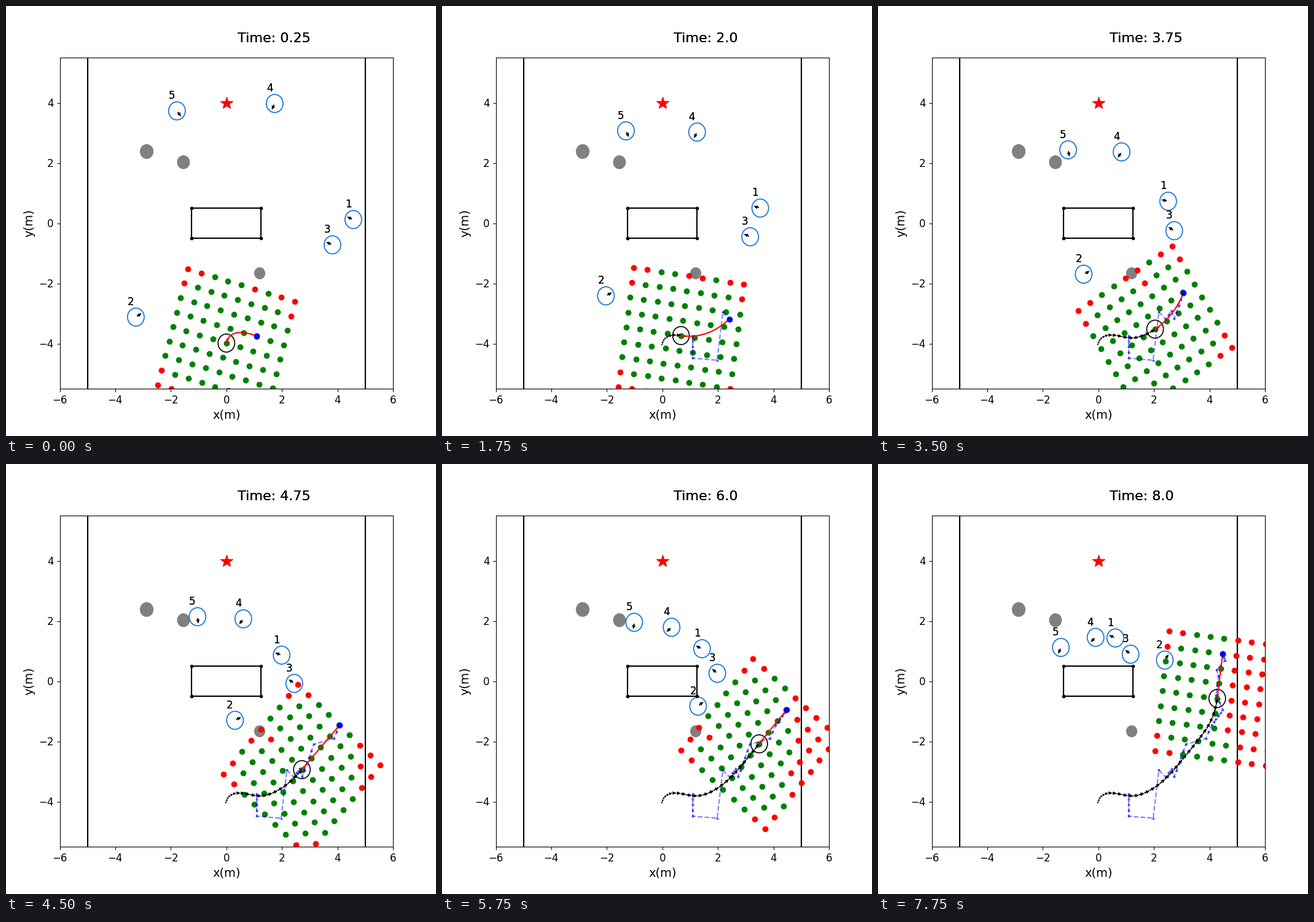
Animation, 700 px wide and 700 px high, one loop 8 s. Source, as a matplotlib script:

```python
import numpy as np
import matplotlib.pyplot as plt
from matplotlib.animation import FuncAnimation
from matplotlib.patches import Circle

plt.rcParams.update({"font.family": "DejaVu Sans", "xtick.labelsize": 12,
                     "ytick.labelsize": 12, "axes.labelsize": 14})

STEPS, DT = 32, 0.25
PX = np.array([542.5 / 12, 539 / 11])   # pixels per metre in x and y
MARGIN = 0.38                           # clearance a sample point needs
REACH = 2.3                             # farthest usable sample point
WALL = 5
BOX = np.array([1.25, 0.5])
BLOCKS = [(-2.87, 2.38, 0.23), (-1.545, 2.025, 0.215), (1.2, -1.665, 0.185)]
PED_COLOR = "#1070d8"

steps = np.arange(STEPS)


def unit(vectors):
    return vectors / np.linalg.norm(vectors, axis=-1, keepdims=True)


def curve(keys):
    """Smooth path through (step, x, y[, heading]) keys: positions and velocities."""
    keys = np.array(keys, float)
    t, p = keys[:, 0], keys[:, 1:3]
    m = np.gradient(p, t, axis=0)
    if keys.shape[1] > 3:
        angle = np.radians(keys[:, 3])
        pace = np.linalg.norm(m, axis=1, keepdims=True)
        m = pace * np.stack([np.cos(angle), np.sin(angle)], axis=1)
    i = np.clip(np.searchsorted(t, steps, side="right") - 1, 0, len(t) - 2)
    h = (t[i + 1] - t[i])[:, None]
    s = (steps - t[i])[:, None] / h
    p0, p1, m0, m1 = p[i], p[i + 1], m[i] * h, m[i + 1] * h
    pos = ((2*s**3 - 3*s**2 + 1) * p0 + (s**3 - 2*s**2 + s) * m0
           + (3*s**2 - 2*s**3) * p1 + (s**3 - s**2) * m1)
    vel = ((6*s**2 - 6*s) * (p0 - p1) + (3*s**2 - 4*s + 1) * m0
           + (3*s**2 - 2*s) * m1) / h
    return pos, vel


def polyline(keys):
    """Straight runs between (step, x, y) keys."""
    t, x, y = np.transpose(keys)
    return np.stack([np.interp(steps, t, x), np.interp(steps, t, y)], axis=1)


# Each pedestrian slows down after the first second and drifts on
peds = [curve(keys) for keys in (
    [(0, 4.57, .12), (4, 3.97, .36), (18, 1.99, .865), (31, .61, 1.435)],
    [(0, -3.26, -3.12), (4, -2.6, -2.72), (18, .31, -1.3), (23, 1.285, -.83),
     (31, 2.39, .7)],
    [(0, 3.82, -.72), (4, 3.41, -.555), (18, 2.445, -.075), (31, 1.16, .895)],
    [(0, 1.74, 3.975), (4, 1.45, 3.395), (18, .61, 2.07), (31, -.1, 1.455)],
    [(0, -1.78, 3.73), (4, -1.48, 3.35), (18, -1.04, 2.14), (27, -1.105, 1.69),
     (31, -1.35, 1.12)],
)]

robot, speed = curve([
    (0, 0, -3.985, 74.3), (4, .245, -3.745, 22.2), (7, .67, -3.735, -8),
    (10, 1.27, -3.815, 5.6), (18, 2.72, -2.94, 48), (23, 3.485, -2.083, 49.4),
    (27, 4.015, -1.388, 60.6), (31, 4.28, -.573, 82.9)])
heading = unit(speed)
track = np.vstack([(-.025, -4.05), robot])

# The local goal slides along, with sudden jumps between runs
goals = polyline([
    (0, 1.09, -3.75), (4, 1.095, -4.485), (5, 1.97, -4.555), (6, 2.18, -2.955),
    (7, 2.42, -3.185), (9, 2.635, -2.905), (10, 2.725, -3.18), (15, 3.15, -2.1),
    (16, 3.87, -1.905), (18, 4.08, -1.465), (23, 4.48, -.948), (25, 4.24, -.46),
    (27, 4.325, .165), (28, 4.26, .38), (29, 4.56, .685), (31, 4.48, .9)])

side = np.linspace(-2, 2, 9)
grid = np.stack(np.meshgrid(side, side), axis=-1).reshape(-1, 2)

fig = plt.figure(figsize=(7, 7), dpi=100)
ax = fig.add_subplot()


def is_free(points):
    free = np.hypot(*grid.T) < REACH
    free &= np.abs(points[:, 0]) < WALL - MARGIN
    for x, y, r in BLOCKS:
        free &= np.hypot(points[:, 0] - x, points[:, 1] - y) > r + MARGIN
    gap = np.maximum(np.abs(points) - BOX, 0)
    return free & (np.hypot(*gap.T) > MARGIN)


def arrows(start, vectors, width, color="k", **style):
    """Arrows whose vectors are given in pixels."""
    ax.quiver(*np.atleast_2d(start).T, *np.atleast_2d(vectors).T, color=color,
              units="dots", scale_units="dots", scale=1, width=width,
              minlength=0, headwidth=3, headlength=3.4, headaxislength=3.1, **style)


def ring(center, color):
    ax.add_patch(Circle(center, 0.3, fill=False, ec=color, lw=1.2))


def label(x, y, text, size):
    # two passes give the slightly heavier strokes
    for _ in range(2):
        ax.text(x, y, text, fontsize=size)


def draw_scene():
    ax.set(xlim=(-6, 6), ylim=(-5.5, 5.5), xlabel="x(m)", ylabel="y(m)")
    for x in (-WALL, WALL):
        ax.plot([x, x], [-6, 6], "k-", lw=1.5)
    for x, y, r in BLOCKS:
        ax.add_patch(Circle((x, y), r, color="gray"))
    w, h = BOX
    ax.plot([-w, w, w, -w, -w], [-h, -h, h, h, -h], "k.-", lw=1.5)
    ax.plot(0, 4, "r*", ms=15)


def draw_peds(k):
    for n, (path, velocity) in enumerate(peds, 1):
        x, y = path[k]
        ring((x, y), PED_COLOR)
        way = unit(velocity[k] * PX)
        arrows((x, y) + way * 2.3 / PX, way * 9, 2)
        label(x - 0.3, y + 0.4, str(n), 12)


def draw_robot(k):
    pos, goal, way = robot[k], goals[k], heading[k]
    turn = np.array([way, (-way[1], way[0])])
    points = pos + grid @ turn
    free = is_free(points)
    ax.plot(*points[free].T, "go")
    ax.plot(*points[~free].T, "ro")

    ring(pos, "k")
    ax.plot(*goals[:k + 1].T, "b.--", lw=1.5, ms=4, alpha=0.5)
    if k:
        arrows(track[:k + 1], np.diff(track[:k + 2], axis=0) * PX, 2, zorder=2)

    # planned path leaves along the heading and bends to the goal
    bend = pos + way * 0.52 * np.hypot(*(goal - pos))
    s = np.linspace(0, 1, 30)[:, None]
    plan = (1 - s)**2 * pos + 2 * s * (1 - s) * bend + s**2 * goal
    ax.plot(*plan.T, "r-", lw=1.5)
    arrows(pos, way * 10, 1.7, "r")
    ax.plot(*goal, "bo")


def draw(k):
    ax.clear()
    draw_scene()
    draw_peds(k)
    draw_robot(k)
    label(0.4, 6.02, f"Time: {(k + 1) * DT}", 16)
    return []


anim = FuncAnimation(fig, draw, frames=STEPS, init_func=lambda: [],
                     interval=250, repeat=True, repeat_delay=0)
plt.show()
```
